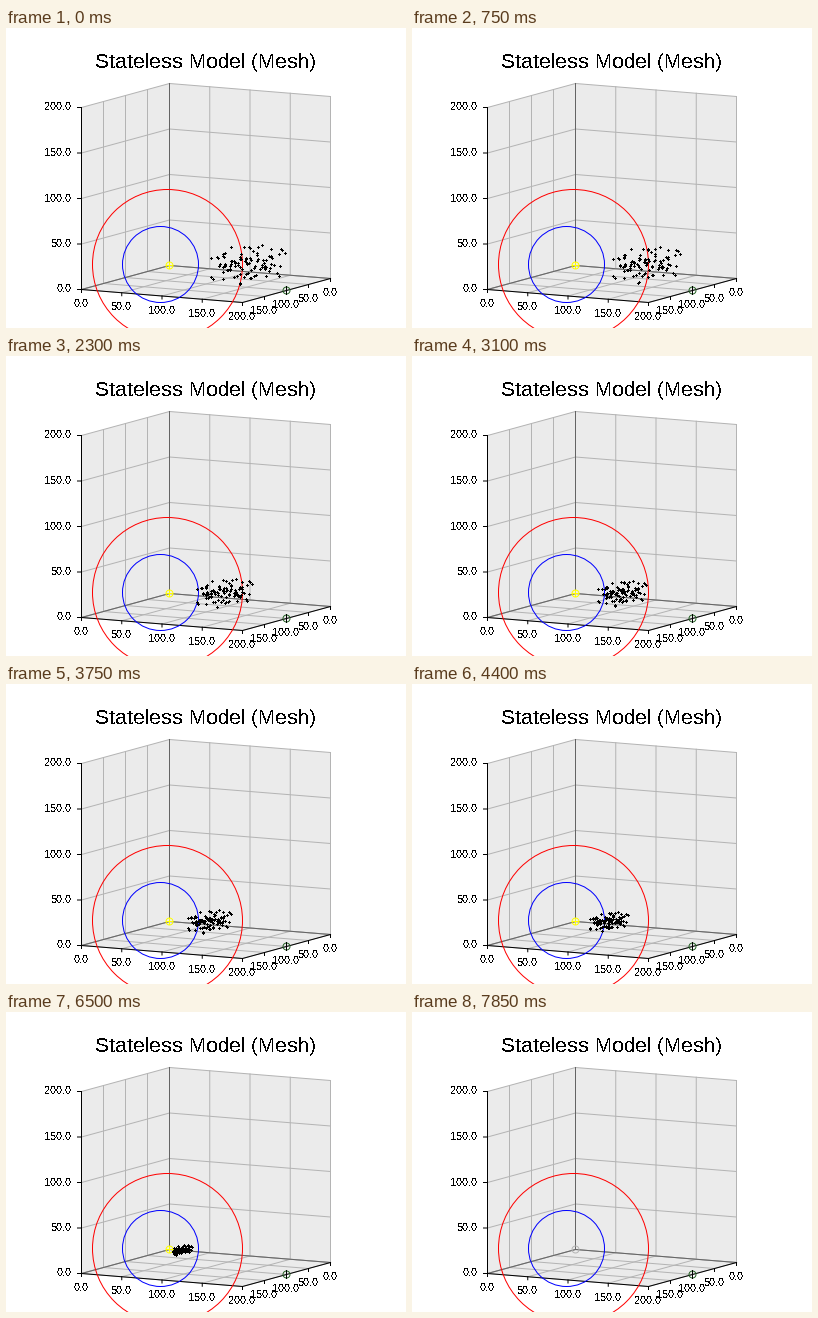
Recreate the animation shown at these times as a matplotlib script. Size 400x300 px, loop 8 s.

```python
import matplotlib.pyplot as plt
import numpy as np
from matplotlib.animation import FuncAnimation
from matplotlib.collections import PolyCollection
from matplotlib.patches import Circle, Polygon

W, H, DPI = 400, 300, 100
STEP, FRAMES = 50, 160
PT = 72 / DPI  # points per pixel

plt.rcParams.update({
    "font.family": "Liberation Sans",
    "text.hinting": "native",
    "text.hinting_factor": 1,
    "text.antialiased": False,
    "path.snap": False,
})
fig = plt.figure(figsize=(W / DPI, H / DPI), dpi=DPI, facecolor="white")
ax = fig.add_axes([0, 0, 1, 1])
ax.set_xlim(0, W)
ax.set_ylim(H, 0)
ax.axis("off")

ORIGIN = np.array([163.5, 237.5])
BASIS = np.array([[161, 13], [-88, 24], [0, -182]]) / 200


def project(p):
    return ORIGIN + np.asarray(p, float) @ BASIS


def stroke(x0, y0, x1, y1, color, z):
    ax.plot([x0, x1], [y0, y1], color=color, lw=PT, zorder=z)


def line(a, b, color, z=2):
    stroke(*project(a), *project(b), color, z)


def text(x, y, s, px, ha="center"):
    ax.text(x, y, s, fontsize=px * PT, ha=ha, va="center_baseline",
            color="black", zorder=5)


def ring(x, y, r, color, z=6):
    patch = Circle((x, y), r, fill=False, ec=color, lw=PT, zorder=z)
    return ax.add_patch(patch)


# walls and floor
L = 200
for quad in ([(0, 0, 0), (0, L, 0), (0, L, L), (0, 0, L)],
             [(0, 0, 0), (L, 0, 0), (L, 0, L), (0, 0, L)],
             [(0, 0, 0), (L, 0, 0), (L, L, 0), (0, L, 0)]):
    ax.add_patch(Polygon(project(quad), fc="#ebebeb", ec="none", zorder=1))

GRID, EDGE = "#b4b4b4", "#646464"
for v in range(0, L + 1, 50):
    line((0, v, 0), (0, v, L), GRID)
    line((v, 0, 0), (v, 0, L), GRID)
    line((0, 0, v), (0, L, v), GRID)
    line((0, 0, v), (L, 0, v), GRID)
    line((v, 0, 0), (v, L, 0), GRID)
    line((0, v, 0), (L, v, 0), GRID)
for end in ((L, 0, 0), (0, L, 0), (0, 0, L)):
    line((0, 0, 0), end, EDGE, 3)

# front axes with ticks and labels
line((0, L, 0), (0, L, L), "black", 4)
line((0, L, 0), (L, L, 0), "black", 4)
line((L, L, 0), (L, 0, 0), "black", 4)
for v in range(0, L + 1, 50):
    x, y = project((0, L, v))
    stroke(x - 4, y, x, y, "black", 4)
    text(65.5, y - 1, f"{v:.1f}", 11, "right")
    for point in ((v, L, 0), (L, v, 0)):
        x, y = project(point)
        stroke(x, y, x, y + 3, "black", 4)
        text(x - 0.5, y + 13.5, f"{v:.1f}", 11)

text(199.5, 33, "Stateless Model (Mesh)", 21)

# range circles and station markers
ring(161.5, 236.5, 75, "#ff0000")
ring(154.5, 236.5, 38, "#0000ff")

gx, gy = project((L, L / 2, 0))
ring(gx, gy, 3.5, "#286428")
stroke(gx, gy - 4, gx, gy + 4, "black", 6)

goal_ring = ring(*ORIGIN, 3.5, "#ffff00", 7)
ox, oy = ORIGIN
goal_cross, = ax.plot([ox - 3, ox + 3, np.nan, ox, ox],
                      [oy, oy, np.nan, oy - 3, oy + 3],
                      color="#ffff00", lw=PT, zorder=7)

# swarm, spread evenly along each axis of its box
COUNT = 100
rng = np.random.default_rng(12)
levels = np.stack([rng.permutation(COUNT) for _ in range(3)], axis=1)
low, high = np.array([95, 0, 2]), np.array([153, 100, 32])
start = low + (high - low) * (levels + 0.5) / COUNT

PLUS = np.array([(0, -1), (1, -1), (1, 0), (2, 0), (2, 1), (1, 1),
                 (1, 2), (0, 2), (0, 1), (-1, 1), (-1, 0), (0, 0)])
dots = PolyCollection([], facecolors="black", edgecolors="none", zorder=8)
ax.add_collection(dots, autolim=False)


def update(i):
    t = i * STEP / 1000
    near = 1 - t / 8.15
    pos = project(start * (near, 1 - t / 10.5, near))
    done = t >= 7.75
    alive = (pos[:, 0] > ORIGIN[0] + 4) & (not done)
    dots.set_verts([PLUS + p for p in np.floor(pos[alive])])
    goal_ring.set_edgecolor("#b4b4b4" if done else "#ffff00")
    goal_cross.set_visible(not done)
    return dots, goal_ring, goal_cross


anim = FuncAnimation(fig, update, frames=FRAMES, interval=STEP,
                     repeat=True, repeat_delay=0, blit=False)
plt.show()
```
